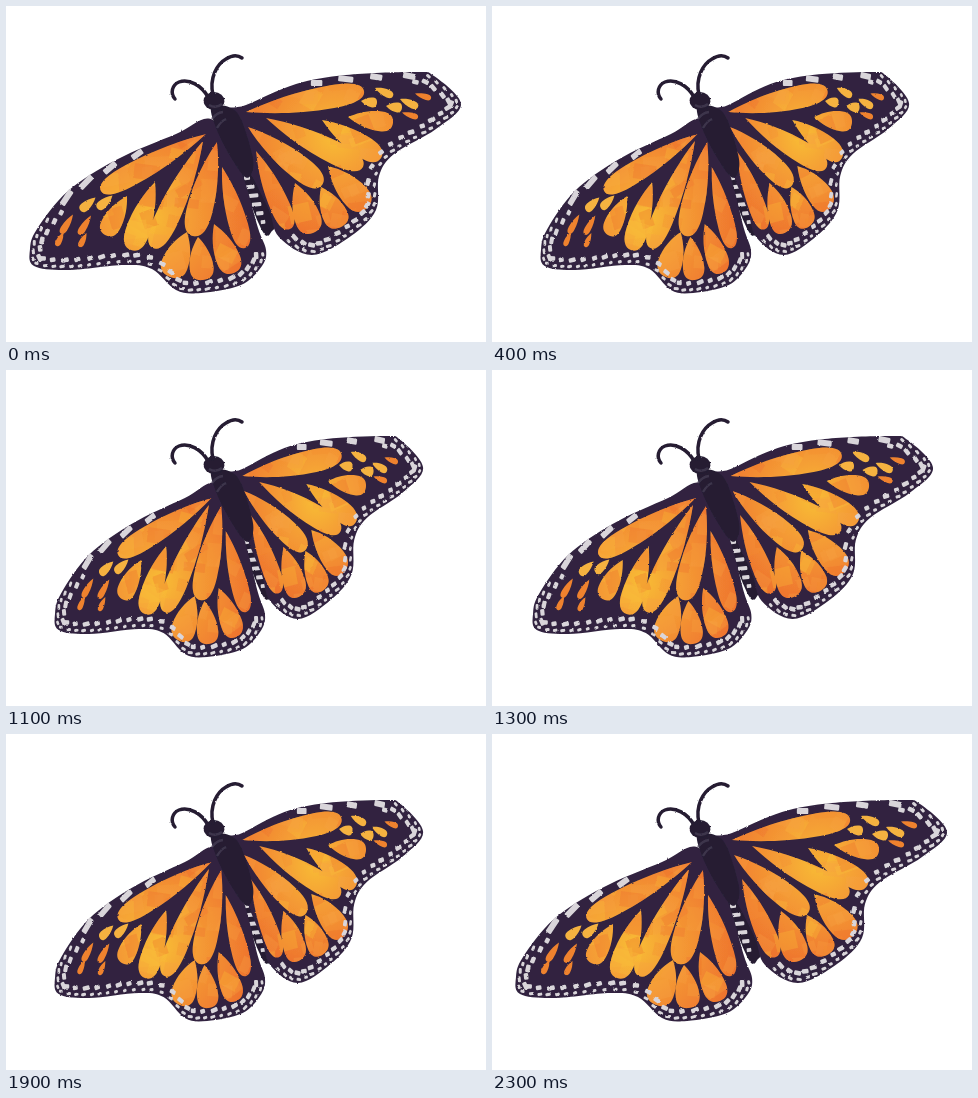
Animation of 480x336 px, one loop 3 s. Source, as an HTML page:

```html
<!DOCTYPE html>
<html lang="en">
<head>
<meta charset="utf-8">
<title>Butterfly</title>
<style>
html, body { margin: 0; width: 100%; height: 100%; overflow: hidden; background: #fff; }
svg { display: block; width: 100vw; height: 100vh; }
</style>
</head>
<body>
<svg id="stage" viewBox="0 0 480 336" xmlns="http://www.w3.org/2000/svg">
  <defs id="defs">
    <filter id="rough" filterUnits="userSpaceOnUse" x="0" y="0" width="480" height="336">
      <feTurbulence type="fractalNoise" baseFrequency="0.35" numOctaves="2" seed="4" result="noise"/>
      <feDisplacementMap in="SourceGraphic" in2="noise" scale="2" xChannelSelector="R" yChannelSelector="G"/>
    </filter>
  </defs>
  <g filter="url(#rough)">
    <g id="abdomen"></g>
    <g id="left"></g>
    <g id="right"></g>
    <g id="thorax"></g>
  </g>
</svg>
<script>
const DARK = '#30243f', BODY = '#251d33', PALE = '#d9d5da';
const YELLOW = '#f5b240', ORANGE = '#ef822f';
const $ = id => document.getElementById(id);

function add(parent, tag, attrs) {
  const el = document.createElementNS('http://www.w3.org/2000/svg', tag);
  for (const k in attrs) el.setAttribute(k, attrs[k]);
  return parent.appendChild(el);
}

function random(seed) {
  return () => (seed = (seed * 16807) % 2147483647) / 2147483647;
}

// Smooth closed curve through "x,y x,y ..."
function curve(text) {
  const p = text.split(' ').map(s => s.split(',').map(Number));
  const n = p.length, at = i => p[(i + n) % n];
  let d = 'M' + p[0];
  for (let i = 0; i < n; i++) {
    const [a, b, c, e] = [-1, 0, 1, 2].map(j => at(i + j));
    d += `C${b.map((v, j) => v + (c[j] - a[j]) / 6)} ${c.map((v, j) => v - (e[j] - b[j]) / 6)} ${c}`;
  }
  return d + 'Z';
}

// Drop with its point at (x0, y0) and its round end at (x1, y1)
function petal([x0, y0, x1, y1, width]) {
  const dx = x1 - x0, dy = y1 - y0, h = width / 2 / Math.hypot(dx, dy);
  const at = (u, v) => [x0 + dx * u - dy * h * v, y0 + dy * u + dx * h * v];
  return `M${at(0, 0)}C${at(.2, -.55)} ${at(.45, -1)} ${at(.73, -1)}C${at(.92, -1)} ${at(1, -.6)} ${at(1, 0)}` +
    `C${at(1, .6)} ${at(.92, 1)} ${at(.73, 1)}C${at(.45, 1)} ${at(.2, .55)} ${at(0, 0)}Z`;
}

const wings = {
  left: {
    edge: '207,114 170,128 110,154 62,185 31,223 24,243 28,260 62,264 118,259 146,263 170,284 195,287 235,279 256,260 260,244 252,222 235,165',
    cells: [
      [200, 128, 95, 185, 22], [121, 190, 99, 229, 20], [149, 176, 125, 244, 24],
      [197, 135, 147, 242, 24], [211, 136, 187, 230, 26], [216, 161, 239, 242, 19],
      [181, 226, 164, 271, 27], [192, 231, 197, 274, 24], [208, 218, 228, 267, 24]
    ],
    // from, to, direction, width, colour of a pair of small cells
    pairs: [[82, 198, 99, 196, -15, 13, 9, YELLOW], [61, 218, 79, 219, -12, 19, 7, ORANGE],
      [54, 233, 77, 234, -7, 14, 6, ORANGE]],
    glow: [142, 212], side: -1, pivot: 250, lead: 85, seed: 91
  },
  right: {
    edge: '218,107 240,99 290,78 340,69 410,66 428,70 455,98 430,123 388,148 373,170 370,204 345,230 306,249 273,231 262,202 236,150',
    cells: [
      [240, 106, 358, 85, 23], [342, 111, 387, 117, 20], [316, 114, 375, 152, 22],
      [260, 112, 357, 161, 23], [242, 121, 316, 179, 24], [250, 145, 284, 223, 20],
      [322, 160, 361, 202, 27], [315, 181, 335, 221, 25], [289, 177, 307, 227, 26]
    ],
    pairs: [[363, 96, 388, 101, 16, 2, 10, YELLOW], [378, 86, 403, 97, 18, 8, 8, YELLOW],
      [404, 109, 417, 90, 16, 5, 6, ORANGE]],
    glow: [328, 130], side: 1, pivot: 217, lead: 100, seed: 57
  }
};

function glow(name, [cx, cy]) {
  const g = add($('defs'), 'radialGradient', { id: name + 'Fill', gradientUnits: 'userSpaceOnUse', cx, cy, r: 105 });
  ['#f8bd35', '#f5a136', '#f28a31', '#ee732e'].forEach((color, i) =>
    add(g, 'stop', { offset: i / 3, 'stop-color': color }));
}

// Painted patches inside the cells
function facets(g, name, d, [cx, cy], rnd) {
  add(add($('defs'), 'clipPath', { id: name + 'Clip' }), 'path', { d });
  const paint = add(g, 'g', { 'clip-path': `url(#${name}Clip)` });
  const tones = ['#f8c03a', '#f3a142', '#ec6a2c', '#f28a31', '#f3a040'];
  for (let i = 0; i < 80; i++) {
    const x = cx + (rnd() - .5) * 200, y = cy + (rnd() - .5) * 200;
    add(paint, 'rect', { x, y, width: 10 + rnd() * 18, height: 8 + rnd() * 16, opacity: .3,
      fill: tones[Math.floor(rnd() * 5)], transform: `rotate(${rnd() * 70 - 35} ${x} ${y})` });
  }
}

// Pale spots that follow the outline at a given depth
function spots(g, outline, side, { from, to, step, depth, w, h }, rnd) {
  for (let s = from; s < to; s += step * (.85 + rnd() * .3)) {
    const p = outline.getPointAtLength(s), a = outline.getPointAtLength(s - 3), b = outline.getPointAtLength(s + 3);
    const turn = Math.atan2(b.y - a.y, b.x - a.x);
    const x = p.x - side * Math.sin(turn) * depth, y = p.y + side * Math.cos(turn) * depth;
    const size = .8 + rnd() * .4;
    add(g, 'rect', { x: -w * size / 2, y: -h / 2, width: w * size, height: h, rx: 1.2, fill: PALE,
      transform: `translate(${x} ${y}) rotate(${turn * 180 / Math.PI + side * 12})` });
  }
}

function drawWing(name) {
  const g = $(name), w = wings[name], rnd = random(w.seed);
  const outline = add(g, 'path', { d: curve(w.edge), fill: DARK });
  const d = w.cells.map(petal).join('');
  glow(name, w.glow);
  add(g, 'path', { d, fill: `url(#${name}Fill)` });
  facets(g, name, d, w.glow, rnd);

  for (const [x0, y0, x1, y1, dx, dy, width, fill] of w.pairs) {
    for (const [x, y] of [[x0, y0], [x1, y1]]) {
      add(g, 'path', { d: petal([x - dx / 2, y - dy / 2, x + dx / 2, y + dy / 2, width]), fill });
    }
  }

  const tip = w.lead + 115, end = outline.getTotalLength() - 142;
  spots(g, outline, w.side, { from: w.lead, to: tip - 10, step: 30, depth: 4, w: 14, h: 6 }, rnd);
  spots(g, outline, w.side, { from: tip, to: end, step: 9.5, depth: 3.5, w: 5, h: 3 }, rnd);
  spots(g, outline, w.side, { from: tip - 15, to: end, step: 12, depth: 10, w: 6.5, h: 4.5 }, rnd);
}

function drawBody() {
  const a = $('abdomen'), t = $('thorax');
  add(a, 'path', { d: curve('215,112 232,112 255,182 268,216 266,225 257,226 235,172'), fill: BODY });
  for (let i = 0; i < 6; i++) {
    const x = 241 + i * 3.2, y = 172 + i * 8.8, w = 6 + 4 * Math.sin(i * .7);
    add(a, 'rect', { x: x - w / 2, y: y - 2, width: w, height: 4, rx: 1, fill: PALE, transform: `rotate(-6 ${x} ${y})` });
  }
  add(t, 'path', { d: curve('205,106 212,99 232,108 246,148 246,166 238,170 218,139'), fill: BODY });
  add(t, 'ellipse', { cx: 208, cy: 95, rx: 10.5, ry: 9, fill: BODY });
  add(t, 'path', { d: 'M203 99Q210 103 216 98M206 113Q210 107 217 106M211 122Q215 115 220 113',
    fill: 'none', stroke: '#494057', 'stroke-width': 2.4, opacity: .7 });
  add(t, 'path', { d: 'M202 91C196 80 183 72 173 76C166 79 164 87 169 93M207 89C203 72 211 58 220 53C226 49 232 49 236 52',
    fill: 'none', stroke: BODY, 'stroke-width': 3.5, 'stroke-linecap': 'round' });
}

drawWing('left');
drawWing('right');
drawBody();

// How far each wing is folded in each pose
const folds = { left: [0, .0756, .111, .1286], right: [0, .0586, .159, .176] };
const LOOP = 3000;
const beats = [[0, 0], [200, 1], [400, 2], [600, 3], [1100, 2], [1300, 1],
  [1500, 2], [1700, 3], [1900, 2], [2100, 1], [2300, 0]];

function render(ms) {
  const pose = beats.filter(([from]) => from <= ms % LOOP).pop()[1];
  for (const name in folds) {
    const k = folds[name][pose];
    $(name).setAttribute('transform', `matrix(${1 - k} 0 0 1 ${wings[name].pivot * k} 0)`);
  }
}

const start = performance.now();
function tick() {
  render(Math.max(0, performance.now() - start));
  requestAnimationFrame(tick);
}
render(0);
requestAnimationFrame(tick);
</script>
</body>
</html>
```
